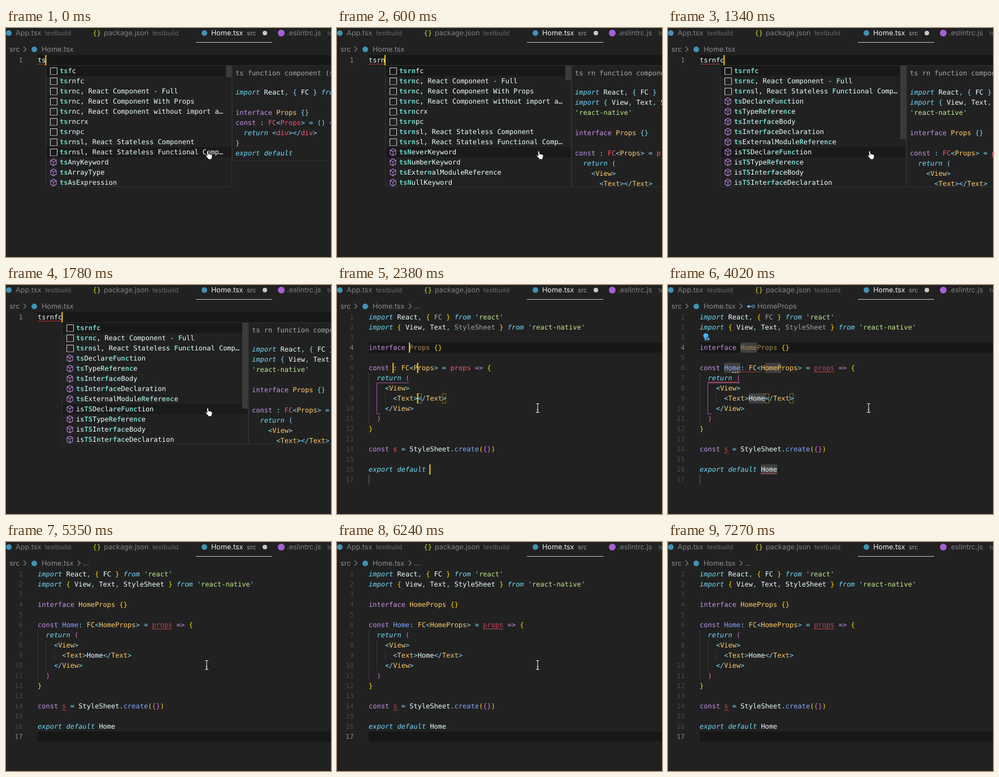
Recreate the animation shown at these times as an HTML page. Size 575 px wide and 406 px high, loop 7370 ms.

```html
<!DOCTYPE html>
<html lang="en">
<head>
<meta charset="utf-8">
<title>Editor snippet</title>
<style>
html, body { margin: 0; width: 100%; height: 100%; overflow: hidden; background: #212121; }
svg { display: block; width: 575px; height: 406px; }
text { white-space: pre; text-rendering: geometricPrecision; }
.mono { font: 12px "DejaVu Sans Mono", "Liberation Mono", monospace; }
.ui { font: 12.6px Inter, Roboto, "Liberation Sans", sans-serif; }
.small { font-size: 11.4px; }
.w { fill: #eeffff; } .W { fill: #9ea6a6; }
.y { fill: #ffcb6b; } .Y { fill: #a98a52; }
.r { fill: #ff5370; } .R { fill: #bd4459; }
.i { fill: #6fdcfa; font-style: italic; }
.c { fill: #7fdcff; }
.k { fill: #c792ea; }
.s { fill: #c3e88d; }
.b { fill: #82aaff; }
.g { fill: #ffd700; }
.m { fill: #da70d6; }
.t { fill: #a9a9a9; }
.h { fill: #6bd3c8; font-weight: bold; }
</style>
</head>
<body>
<svg id="stage" viewBox="0 0 575 406" xmlns="http://www.w3.org/2000/svg">
  <defs>
    <clipPath id="popClip"><rect y="66" width="575" height="215"/></clipPath>
    <path id="cube" d="M0-6 5-3.3V3.3L0 6-5 3.3V-3.3ZM-5-3.3 0-.8 5-3.3M0-.8V6" fill="none" stroke="#b180d7" stroke-width="1.1"/>
    <g id="snippet" fill="none" stroke="#d4d4d4">
      <path d="M-5.5 6.5V-5.5H6.5V6.5"/>
      <path d="M-5.5 6.5H6.5" stroke-dasharray="2 1"/>
    </g>
    <path id="hand" d="M4 1.2C5.2.6 6 1.2 6.1 2.4L6.4 6.5C7.5 5.8 8.6 6 8.8 7 9.9 6.4 10.9 6.8 11 7.7 12.2 7.3 13 8 13 9.2 13 11.5 12.6 13 11.8 14.5V16H5.6V14.8C4.2 13 2.4 11.5 1.2 9.6.6 8.4 1.8 7.6 2.9 8.4L4 9.4 3.2 2.6Z" fill="#fff" stroke="#000" stroke-width=".9"/>
    <path id="beam" d="M-3-8Q-1-8 0-7 1-8 3-8M0-7V7M-3 8Q-1 8 0 7 1 8 3 8M-1.5 3H1.5" fill="none"/>
    <path id="chevron" d="M-2.5-4.5 2 0-2.5 4.5" fill="none" stroke="#8a8a8a" stroke-width="1.1"/>
  </defs>
  <g id="scene"></g>
</svg>
<script>
const LOOP = 7370, CW = 7.224, LEFT = 56, TOP = 48, LH = 18;
const scene = document.getElementById('scene');

const esc = s => s.replace(/&/g, '&amp;').replace(/</g, '&lt;');
const rect = (x, y, w, h, fill, extra = '') =>
  `<rect x="${x}" y="${y}" width="${w}" height="${h}" fill="${fill}" ${extra}/>`;
const circle = (x, y, r, fill) => `<circle cx="${x}" cy="${y}" r="${r}" fill="${fill}"/>`;
const line = (d, color, w = 1) => `<path d="${d}" fill="none" stroke="${color}" stroke-width="${w}"/>`;
const use = (id, x, y, extra = '') => `<use href="#${id}" x="${x}" y="${y}" ${extra}/>`;
const ui = (x, y, s, fill, cls = '') => `<text class="ui ${cls}" x="${x}" y="${y}" fill="${fill}">${esc(s)}</text>`;
const col = n => LEFT + n * CW;
const rowY = n => TOP + (n - 1) * LH;

// "~kconst~w x" : each ~ is followed by a colour class letter
const mono = (x, y, markup) => `<text class="mono" x="${x}" y="${y}">` +
  markup.split('~').slice(1).map(p => `<tspan class="${p[0]}">${esc(p.slice(1))}</tspan>`).join('') + '</text>';

function squiggle(row, from, to, color = '#f0504f') {
  const x0 = col(from), x1 = col(to), y = rowY(row) + 17;
  let d = `M${x0} ${y}`;
  for (let x = x0 + 2, up = 1; x <= x1 + 1; x += 2, up ^= 1) d += `L${x} ${y - 2 * up}`;
  return line(d, color, .9);
}
const caret = (row, n) => rect((col(n) - 1).toFixed(1), rowY(row), 2, LH, '#ffcc00');
const number = (n, active) =>
  `<text class="mono" x="29.8" y="${rowY(n) + 13}" text-anchor="end" fill="${active ? '#848484' : '#484848'}">${n}</text>`;
const activeLine = n => rect(LEFT, rowY(n), 575 - LEFT, LH, '#171717');

function header(t) {
  const blue = '#3f93b5', dim = '#808080', faint = '#686868';
  let s = circle(5, 9, 5, blue) + ui(17, 13.4, 'App.tsx', dim) + ui(69, 13.2, 'testbuild', faint, 'small')
    + `<text class="mono" x="153.5" y="13" fill="#d6d32e" font-weight="bold">{}</text>`
    + ui(173, 13.4, 'package.json', dim) + ui(259, 13.2, 'testbuild', faint, 'small')
    + circle(351, 9, 5, blue) + ui(363, 13.4, 'Home.tsx', '#f0f0f0') + ui(426, 13.2, 'src', '#a0a0a0', 'small')
    + rect(336, 25, 135, 1, '#c8c8c8')
    + circle(487, 9, 6, '#a85fd6') + ui(497, 13.4, '.eslintrc.js', dim) + ui(568.5, 13.2, 'testbuild', faint, 'small');
  if (t < 5650) s += circle(458, 9, 4, '#c8c8c8');
  s += ui(6, 42.2, 'src', '#8e8e8e') + use('chevron', 33.5, 37.5) + circle(50, 38, 5, blue) + ui(63, 42.2, 'Home.tsx', '#8e8e8e');
  if (t >= 2080) {
    s += use('chevron', 129.5, 37.5);
    if (t < 2520 || t >= 5060) s += ui(136, 42.2, '...', '#8e8e8e');
    else s += circle(142.5, 38, 2.3, '#75beff') + circle(151, 38, 2.4, 'none" stroke="#75beff')
      + line('M144 38H148.5', '#75beff', 1.2) + ui(158, 42.2, t < 4020 ? 'Props' : 'HomeProps', '#8e8e8e');
  }
  return s;
}

const SNIPPETS = ['rnfc', 'rnc, React Component - Full', 'rnc, React Component With Props',
  'rnc, React Component without import a…', 'rncrx', 'rnpc',
  'rnsl, React Stateless Component', 'rnsl, React Stateless Functional Comp…'];
const SYMBOLS = {
  2: ['ts|AnyKeyword', 'ts|ArrayType', 'ts|AsExpression'],
  3: ['ts|A|r|rayType', 'ts|Neve|r|Keyword', 'ts|Numbe|r|Keyword', 'ts|Type|R|eference'],
  4: ['tsN|eve|r|Keyword', 'tsN|umbe|r|Keyword', 'ts|Exte|rn|alModuleReference', 'tsN|ullKeywo|r|d']
};
const FUZZY = ['tsrnfc', 'tsrnc|, React Component - |F|ull', 'tsrn|sl, React Stateless |F|un|c|tional Comp…',
  'ts|Decla|r|e|F|u|nc|tion', 'ts|Type|R|e|f|ere|nc|e', 'ts|I|n|te|rf|a|c|eBody', 'ts|I|n|te|rf|a|c|eDeclaration',
  'ts|ExternalModule|R|e|f|ere|nc|e', '|is|TS|Decla|r|e|F|u|nc|tion', '|is|TS|Type|R|e|f|ere|nc|e',
  '|is|TS|I|n|te|rf|a|c|eBody', '|is|TS|I|n|te|rf|a|c|eDeclaration'];
const BAR = { 2: 20, 3: 23, 4: 26, 5: 130, 6: 152 };

function popupItems(n) {
  if (n > 4) return n > 5 ? FUZZY : ['tsrnf|c', ...FUZZY.slice(1)];
  const names = (n === 2 ? ['fc'] : []).concat(SNIPPETS).map(s => 'ts' + s);
  return names.map(s => s.slice(0, n) + '|' + s.slice(n)).concat(SYMBOLS[n]);
}

const IMPORT = "~iimport~w React~c, {~w FC ~c} ~ifrom~c '~sreact~c'";
const DOC_WEB = ['~tts function component (simple)', '', IMPORT, '', '~kinterface ~yProps~c {}',
  '~kconst~c : ~rFC~c<~rProps~c> = () ~k=>~c {', '~i  return~c <~rdiv~c></~rdiv~c>', '~c}', '~iexport default'];
const DOC_NATIVE = ['~tts rn function component', '', IMPORT,
  '~iimport~c {~w View~c,~w Text~c,~w StyleSheet~c } ~ifrom', "~c'~sreact-native~c'", '',
  '~kinterface ~yProps~c {}', '', '~kconst~c : ~rFC~c<~yProps~c> = ~rprops ~k=>~c {', '~i  return~c (',
  '~c    <~yView~c>', '~c      <~yText~c></~yText~c>'];

function popup(n) {
  const x = Math.round(col(n)), items = popupItems(n), plain = n === 2 ? 9 : n < 5 ? 8 : 3;
  const doc = n === 2 ? DOC_WEB : DOC_NATIVE, side = x + 330, docH = n === 2 ? 169 : 215;
  const edge = 'stroke="#303030"';
  let s = rect(x + .5, 66.5, 329, 215, '#212121', edge) + '<g clip-path="url(#popClip)">'
    + rect(x + 1, 67, 328, LH, '#181818') + rect(x + 1, 211, 328, LH, '#1a1a1a');
  items.forEach((item, i) => {
    const y = 67 + i * LH;
    s += use(i < plain ? 'snippet' : 'cube', x + 14, y + 9);
    s += mono(x + 25, y + 13, item.split('|').map((p, j) => (j % 2 ? '~w' : '~h') + p).join(''));
  });
  s += rect(x + 319, 67, 10, BAR[n], '#3b3b3b') + '</g>';
  s += rect(side + .5, 66.5, 260, docH, '#212121', edge) + '<g clip-path="url(#popClip)">';
  doc.forEach((d, i) => {
    // the summary line has a little extra padding below it
    if (d) s += mono(side + 6, i ? 82 + i * LH : 84, d);
  });
  return s.replace(/y="118"/g, 'y="118"') + '</g>';
}

function typing(t) {
  const n = t < 300 ? 2 : t < 600 ? 3 : t < 900 ? 4 : t < 1340 ? 5 : 6;
  const shown = t >= 1340 && t < 1780 ? 5 : n;
  return activeLine(1) + number(1, true) + mono(LEFT, 61, '~w' + 'tsrnfc'.slice(0, n))
    + squiggle(1, 0, t >= 1340 && t < 1490 ? 5 : n) + caret(1, n) + popup(shown);
}

function codeLines(t, name) {
  const unused = t >= 2380 && t < 4170;
  const w = unused ? '~W' : '~w', y = unused ? '~Y' : '~y', r = t >= 4020 ? '~R' : '~r';
  return {
    1: `~iimport~w React~c, ~g{${w} FC ~g}~i from~c '~sreact~c'`,
    2: `~iimport ~g{~w View~c,~w Text~c,${w} StyleSheet ~g}~i from~c '~sreact-native~c'`,
    4: `~kinterface ${y}${name}Props ~g{}`,
    6: `~kconst ~b${name}~c: ~yFC~c<~y${name}Props~c> = ${r}props ~k=> ~g{`,
    7: '~i  return ~m(',
    8: '~c    <~yView~c>',
    9: `~c      <~yText~c>~w${name}~c</~yText~c>`,
    10: '~c    </~yView~c>',
    11: '~m  )',
    12: '~g}',
    14: `~kconst ${r}s~c = ~wStyleSheet~c.~bcreate~g(~m{}~g)`,
    16: `~iexport default ~w${name}`
  };
}

function lints(t, len) {
  let s = '';
  if (t >= 2670 && t < 4020) {
    s += squiggle(6, 0, 7 + len, '#b0454c') + squiggle(6, 10 + len, 17 + 2 * len, '#b0454c')
      + squiggle(16, 13, 15) + squiggle(7, 2, 9.8);
    for (let i = 0; i < 3; i++) s += rect(col(8 + len) + i * 4, 154, 2, 2, '#bdbdbd');
  }
  if (t >= 4020) {
    s += squiggle(6, 28, 33) + squiggle(14, 6, 7);
    if (t < 4170) {
      s += squiggle(6, 9, 15, '#b0454c') + squiggle(7, 2, 9.8) + squiggle(16, 15, 19);
      for (let i = 0; i < 3; i++) s += rect(114 + i * 4, 154, 2, 2, '#bdbdbd');
    }
  }
  return s;
}

function bulb() {
  return circle(67, 90, 4.6, '#4db2ff') + rect(65, 94, 4, 4, '#4db2ff')
    + circle(71, 95.5, 3.4, '#212121') + circle(71, 95.5, 2.6, '#4db2ff') + circle(71, 95.5, 1, '#212121');
}

function editing(t) {
  const name = 'Home'.slice(0, t < 2970 ? 0 : t < 3120 ? 1 : t < 3420 ? 2 : t < 3570 ? 3 : 4);
  const len = name.length, linked = t < 4770, current = linked ? 4 : 17;
  const slots = [[4, 10], [6, 6], [6, 12 + len], [9, 12], [16, 15]];
  const lines = codeLines(t, name);
  let s = activeLine(current);
  for (let n = 1; n <= 17; n++) s += number(n, n === current);

  s += line('M56.5 156V246M70.5 174V228M85.5 192V210', '#383838');
  if (linked) {
    for (const [row, c] of slots) s += rect(col(c), rowY(row), len * CW, LH, '#404040');
    for (const c of [12 + len, 18 + len])
      s += rect(col(c) + .5, 192.5, CW - 1, 17, 'none', 'stroke="#857016"');
    s += line('M56.5 336V354', '#606060');
  }
  if (t >= 2380 && t < 4910) s += line('M127 173.5H70.5V228.5H77', '#a4569f');
  for (const n in lines) s += mono(LEFT, rowY(+n) + 13, lines[n]);
  s += lints(t, len);
  if (t >= 2520 && t < 4910) s += bulb();

  const off = [[2670, 2970], [4020, 4470], [5350, 5800], [6240, 6690], [7270, LOOP]];
  if (!off.some(([a, b]) => t >= a && t < b))
    s += linked ? slots.map(([row, c]) => caret(row, c + len)).join('') : rect(56, 336, 2, LH, '#ffcc00');
  return s;
}

function pointer(t) {
  if (t < 2080) return use('hand', 352, 217);
  if (t >= 6990) return '';
  // leaves towards the lower right corner in three jumps
  const step = t < 6540 ? 0 : Math.min(3, Math.floor((t - 6540) / 150) + 1);
  const q = Math.pow(step / 3, 1.5), x = 355 + 212 * q, y = 218 + 162 * q;
  return use('beam', x, y, 'stroke="#000" stroke-width="3"') + use('beam', x, y, 'stroke="#fff" stroke-width="1.2"');
}

let last = '';
function draw(t) {
  const s = header(t) + (t < 2080 ? typing(t) : editing(t)) + pointer(t);
  if (s !== last) scene.innerHTML = last = s;
}

const start = performance.now();
function tick() {
  draw((performance.now() - start) % LOOP);
  requestAnimationFrame(tick);
}
tick();
</script>
</body>
</html>
```
